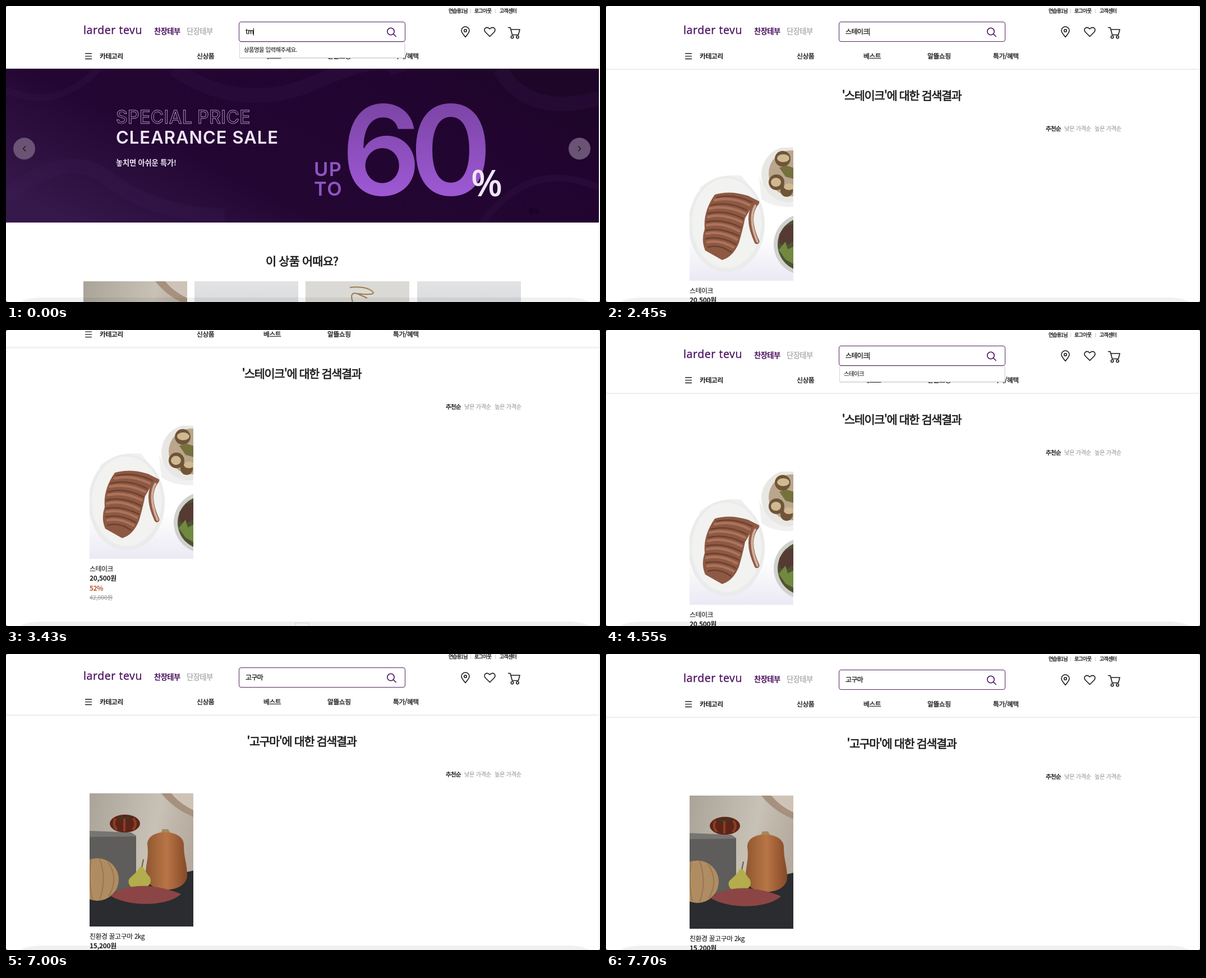
These frames come from a looping animation (1059 by 529 pixels, 8000 ms). An HTML page:

```html
<!DOCTYPE html>
<html lang="ko">
<head>
<meta charset="utf-8">
<style>
  html, body { margin: 0; width: 100%; height: 100%; overflow: hidden; background: #222; }
  #stage { display: block; width: 1059px; height: 529px; background: #fff; border-radius: 3px; }
  text {
    font: 400 11.9px "Noto Sans CJK KR", "Noto Sans CJK", "Noto Sans", sans-serif;
    letter-spacing: -.55px; white-space: pre;
    color: #1c1c1c; fill: currentColor; stroke: currentColor; stroke-width: .35px;
  }
  .top { font-size: 8.9px; }
  .small { font-size: 10.4px; }
  .brand { font-size: 13.3px; }
  .title { font-size: 20.8px; letter-spacing: -.8px; stroke-width: .7px; text-anchor: middle; }
  .bold { font-weight: 700; stroke: none; }
  .light { stroke-width: .12px; }
  .gray { color: #999; stroke-width: .12px; }
  .purple { color: #4b1160; }
  .logo { font: 400 19.5px "Open Sans", sans-serif; letter-spacing: .6px; }
  .promo { font: 600 31px Inter, sans-serif; letter-spacing: 1px; color: #f0e4f8; stroke: none; }
  .outline { font-size: 32px; font-weight: 500; letter-spacing: .4px; fill: none; stroke: #b69bc5; stroke-width: .9px; }
  .up { font-size: 34.4px; letter-spacing: 1.5px; color: #9054c4; }
  .big { font-size: 222px; letter-spacing: 0; text-anchor: middle; fill: url(#violet); }
  .percent { font: 600 65px "Open Sans", sans-serif; letter-spacing: 0; }
  .icon { fill: none; stroke: #1a1a1a; stroke-width: 1.6; stroke-linecap: round; stroke-linejoin: round; }
</style>
</head>
<body>
<svg id="stage" viewBox="0 0 1059 529">
  <defs>
    <linearGradient id="violet" x2="0" y2="1">
      <stop offset=".2" stop-color="#7c45a6"/><stop offset=".85" stop-color="#a05ad8"/>
    </linearGradient>
    <linearGradient id="night" y1=".8" x2="1" y2=".3">
      <stop offset="0" stop-color="#36194b"/><stop offset=".35" stop-color="#230632"/>
      <stop offset=".8" stop-color="#220430"/><stop offset="1" stop-color="#1d0628"/>
    </linearGradient>
    <linearGradient id="wall" x2="1" y2=".3">
      <stop offset="0" stop-color="#aaa397"/><stop offset=".65" stop-color="#c8c1b6"/><stop offset="1" stop-color="#b5aa9d"/>
    </linearGradient>
    <linearGradient id="squash">
      <stop offset="0" stop-color="#8f5730"/><stop offset=".5" stop-color="#b87546"/><stop offset="1" stop-color="#864926"/>
    </linearGradient>
    <linearGradient id="cloth" x2="0" y2="1">
      <stop offset=".65" stop-color="#fff"/><stop offset="1" stop-color="#ebe9f4"/>
    </linearGradient>
    <linearGradient id="pale" x2="0" y2="1">
      <stop offset="0" stop-color="#e2e3e5"/><stop offset="1" stop-color="#d6d7da"/>
    </linearGradient>
    <clipPath id="banner"><path d="M0 112H1057V387H0Z"/></clipPath>

    <symbol id="steak" viewBox="0 0 185 238">
      <rect width="185" height="238" fill="url(#cloth)"/>
      <path d="M18 72Q50 45 92 50L104 65 90 82 20 90ZM124 52Q140 92 185 99V106Q150 108 128 92Z" fill="#f0f0f1"/>
      <ellipse cx="66" cy="137" rx="68" ry="86" fill="#eaebeb"/>
      <ellipse cx="66" cy="135" rx="62" ry="80" fill="#f2f2f1"/>
      <path d="M45 84Q72 76 104 86L124 96Q126 104 110 107L99 126Q94 150 88 170Q78 195 58 201L28 184Q20 166 27 145Q24 114 45 84Z" fill="#8d5943"/>
      <g fill="none" stroke-linecap="round">
        <path d="M48 89Q80 82 112 98M38 103Q68 95 102 112M33 118Q62 110 96 127M30 133Q58 126 92 143M29 148Q55 142 88 158M29 163Q54 157 83 173M33 178Q53 172 74 187" stroke="#6c4030" stroke-width="2.5"/>
        <path d="M45 94Q76 87 107 103M36 109Q66 102 99 118M33 124Q60 117 93 133M31 139Q57 132 88 149M30 154Q55 148 84 164M32 169Q53 164 78 178" stroke="#ad735a" stroke-width="4.5"/>
        <path d="M118 100Q100 125 120 168" stroke="#8f5a45" stroke-width="9"/>
        <path d="M117 104Q104 128 121 168" stroke="#d2b19f" stroke-width="4"/>
      </g>
      <circle cx="178" cy="48" r="50" fill="#e9e7e4"/>
      <circle cx="182" cy="46" r="41" fill="#b9a68d"/>
      <g fill="#6f5436"><circle cx="166" cy="20" r="14"/><circle cx="155" cy="62" r="14"/><circle cx="173" cy="77" r="11"/></g>
      <path d="M160 36l12-4 13 4v20l-14-4z" fill="#75713d"/>
      <g fill="#cfb993"><ellipse cx="167" cy="19" rx="11" ry="7"/><ellipse cx="154" cy="62" rx="9" ry="8"/><ellipse cx="177" cy="70" rx="9" ry="6"/></g>
      <circle cx="205" cy="173" r="55" fill="#d0d1cd"/>
      <circle cx="205" cy="173" r="48" fill="#4f5234"/>
      <path d="M160 155l12-15 13-3v30l-14 9-11-5z" fill="#553a33"/>
      <path d="M159 183l12-15 4 14 10-5v31l-14-8z" fill="#71893f"/>
    </symbol>

    <symbol id="harvest" viewBox="0 0 185 238">
      <rect width="185" height="238" fill="url(#wall)"/>
      <path d="M128 0Q150 28 185 42V30Q160 18 146 0Z" fill="#a6917f"/>
      <path d="M146 0Q160 18 185 30V0Z" fill="#cfc3b7"/>
      <path d="M0 182L80 162 185 138V238H0Z" fill="#2b2c2f"/>
      <path d="M0 68L74 70 83 76V168L0 186Z" fill="#5e5d5b"/>
      <path d="M0 67L74 70 83 77 0 78Z" fill="#777572"/>
      <ellipse cx="63" cy="54" rx="27" ry="16" fill="#5f2418"/>
      <path d="M46 45Q40 57 49 65M62 45V68M78 45Q86 56 77 65" fill="none" stroke="#874027" stroke-width="4"/>
      <path d="M51 41l12 3 10-5-3 8-8-2-8 3z" fill="#343c25"/>
      <path d="M126 73l4-9h10l5 9z" fill="#a48a5c"/>
      <path d="M103 92C101 62 168 62 168 92C168 116 174 125 174 146C174 181 100 181 100 146C100 125 106 116 103 92Z" fill="url(#squash)"/>
      <circle cx="14" cy="154" r="38" fill="#b08c62"/>
      <path d="M3 117Q-3 155 5 190M18 117Q31 154 18 190M33 123Q53 152 34 184" fill="none" stroke="#987850" stroke-width="2"/>
      <path d="M93 133L96 118" stroke="#6f5a2d" stroke-width="2"/>
      <path d="M89 132C98 128 99 142 107 149C120 174 64 180 70 154C77 145 83 144 89 132Z" fill="#b3ad4d"/>
      <path d="M37 183C60 163 112 158 163 180C139 202 72 204 37 183Z" fill="#8c4545"/>
    </symbol>
  </defs>

  <g id="page">
    <g id="home">
      <rect y="112" width="1057" height="275" fill="url(#night)"/>
      <g clip-path="url(#banner)" fill="none" stroke="#40205a" stroke-width="26" opacity=".2">
        <path d="M0 340Q110 250 185 310T390 375M300 112Q420 195 555 135T700 120M880 112Q930 200 1057 165"/>
        <path d="M0 150Q90 190 165 112M850 387Q935 270 1057 325" stroke-width="12"/>
      </g>
      <text class="promo outline" x="196" y="210">SPECIAL PRICE</text>
      <text class="promo" x="196" y="246">CLEARANCE SALE</text>
      <text class="bold" x="196" y="284.5" style="font-size:13.2px;letter-spacing:-.15px;color:#f0e6f5">놓치면 아쉬운 특가!</text>
      <text class="promo up" x="549" y="304">UP</text>
      <text class="promo up" x="549" y="339">TO</text>
      <text class="promo big" x="669" y="338">6</text>
      <text class="promo big" x="793" y="338">0</text>
      <text class="promo percent" x="829" y="340">%</text>
      <text class="small bold" x="932" y="371" style="color:#12031a">문구</text>
      <g fill="#6b5375"><circle cx="32.5" cy="255" r="19.5"/><circle cx="1022.5" cy="255" r="19.5"/></g>
      <path class="icon" d="M34.5 251l-4 4 4 4M1020.5 251l4 4-4 4"/>
      <text class="title" x="527.5" y="464.3">이 상품 어때요?</text>
      <use href="#harvest" x="138" y="492" width="185" height="238"/>
      <g fill="url(#pale)"><path d="M336 492h185v60H336z"/><path d="M733 492h185v60H733z"/></g>
      <path d="M534 492h185v60H534z" fill="#dad9d5"/>
      <path d="M613 503Q640 500 652 509T626 514Q612 510 618 529M626 514L644 522" fill="none" stroke="#a07b4d" stroke-width="2"/>
    </g>

    <g id="results">
      <rect y="112" width="1057" height="2.5" fill="#efefef"/>
      <text id="heading" class="title" x="527" y="168" style="letter-spacing:-1.4px"></text>
      <text class="small" x="784" y="222.7">추천순</text>
      <text class="small gray" x="817" y="222.7">낮은 가격순</text>
      <text class="small gray" x="871" y="222.7">높은 가격순</text>
      <use id="photo" x="149" y="253" width="185" height="238"/>
      <text id="name" class="light" x="149" y="512.7" style="letter-spacing:-.4px"></text>
      <text id="price" class="bold" x="149" y="530" style="letter-spacing:-.3px"></text>
      <g id="discount">
        <text class="bold" x="149" y="548" style="color:#b9572f">52%</text>
        <text class="small gray" x="149" y="564.3" style="letter-spacing:0;text-decoration:line-through">42,000원</text>
      </g>
      <rect x="515.5" y="605.5" width="24" height="24" fill="none" stroke="#e2e2e2"/>
    </g>

    <text class="top" x="789" y="11.6" style="letter-spacing:-.8px">연습용1님</text>
    <text class="top" x="835" y="11.6">로그아웃</text>
    <text class="top" x="880" y="11.6">고객센터</text>
    <path d="M828.5 5v8M872.5 5v8" stroke="#ccc"/>
    <text class="logo purple" x="138" y="50">larder tevu</text>
    <text class="brand bold purple" x="264" y="49.8">찬장테부</text>
    <text class="brand" x="322" y="49.8" style="color:#aaa">단장테부</text>
    <g class="icon">
      <path d="M819 55.5C815 50 812 47.5 812 44a7 7 0 0 1 14 0C826 47.5 823 50 819 55.5Z"/>
      <circle cx="819" cy="44" r="2.3"/>
      <path d="M862.5 54.5L854.5 46.5C850 41 857 35 862.5 41C868 35 875 41 870.5 46.5Z"/>
      <path d="M895.5 38.5h3.5l3.5 13h11l2.500-9.500h-16"/>
      <circle cx="902.5" cy="55.500" r="2.200"/><circle cx="912" cy="55.500" r="2.200"/>
      <path d="M141.500 85h11M141.500 89.700h11M141.500 94.500h11" stroke-width="1.300"/>
    </g>
    <text class="bold" x="167" y="94.300">카테고리</text>
    <text x="340" y="94.300">신상품</text>
    <text x="459" y="94.300">베스트</text>
    <text x="573" y="94.300">알뜰쇼핑</text>
    <text x="690" y="94.300">특가/혜택</text>

    <rect x="415.500" y="28.500" width="296" height="35" rx="3.500" fill="#fff" stroke="#532465"/>
    <g class="icon" style="stroke:#4b1160"><circle cx="686" cy="45.500" r="6.200"/><path d="M690.700 50.200l4.500 4.300"/></g>
    <text id="query" x="427" y="50.300"></text>
    <path id="underline" stroke="#333"/>
    <path id="caret" stroke="#111"/>
    <g id="dropdown">
      <rect x="416" y="66" width="296" height="28" rx="2" opacity=".12"/>
      <rect x="416.500" y="64.500" width="294.500" height="28" rx="2" fill="#fff" stroke="#d5d5d5"/>
      <text id="hint" class="small light" x="424" y="82.200"></text>
    </g>
  </g>
  <path d="M25 529C32 524 50 521 64 521H1003C1018 521 1035 525 1041 529Z" opacity=".06"/>
  <path d="M1057.500 0V529" stroke="#eee"/>
</svg>

<script>
const LOOP = 8000, STEP = 70, MAX_SCROLL = 128;
const $ = id => document.getElementById(id);
const show = (id, on) => $(id).style.display = on ? '' : 'none';
const setText = (id, s) => { if ($(id).textContent !== s) $(id).textContent = s; };

const products = [
  { word: '스테이크', name: '스테이크', price: '20,500원', photo: '#steak' },
  { word: '고구마', name: '친환경 꿀고구마 2kg', price: '15,200원', photo: '#harvest' }
];

// Each track is a list of [start time, value].
const typed = [
  [0, 'tm'], [70, 't'], [210, ''], [490, 'ㅅ'], [560, '스'], [700, '슽'], [770, '스테'],
  [910, '스텡'], [980, '스테이'], [1120, '스테잌'], [1190, '스테이크'],
  [4620, '스테이'], [4760, '스테'], [4830, '스'], [4900, ''],
  [5390, 'ㄱ'], [5460, '고'], [5600, '곡'], [5670, '고구'], [5810, '고굼'], [5880, '고구마']
];
const dropdown = [[0, 1], [280, 0], [490, 1], [1400, 0], [4200, 1], [4970, 0], [5390, 1], [6090, 0]];
const composing = [[0, 0], [490, 1], [1400, 0], [5390, 1], [6090, 0]];
const caret = [[0, 1], [1890, 0], [2450, 1], [4060, 0], [4550, 1], [6580, 0]];
const page = [[0, null], [1470, products[0]], [6160, products[1]]];

const at = (track, t) => track.filter(([start]) => start <= t).pop()[1];
const ramp = (t, from, to) => Math.min(1, Math.max(0, (t - from) / (to - from)));
const scrollPulse = (t, down, downEnd, up, upEnd) =>
  MAX_SCROLL * (ramp(t, down, downEnd) ** 2.5 - ramp(t, up, upEnd) ** 2);

function render(time) {
  const t = Math.floor(time / STEP) * STEP;
  const text = at(typed, t), product = at(page, t);
  const scroll = scrollPulse(t, 2450, 2800, 3220, 3570) + scrollPulse(t, 6930, 7210, 7350, 7700);
  $('page').setAttribute('transform', `translate(0 ${-scroll})`);

  show('home', !product);
  show('results', product);
  if (product) {
    setText('heading', `'${product.word}'에 대한 검색결과`);
    setText('name', product.name);
    setText('price', product.price);
    $('photo').setAttribute('href', product.photo);
    show('discount', product === products[0]);
  }

  setText('query', text);
  const end = 427 + (text ? $('query').getComputedTextLength() : 0);
  $('caret').setAttribute('d', `M${Math.round(end) + .5} 39.5V53`);
  $('underline').setAttribute('d', `M${end - 10} 52.5H${end}`);
  show('caret', at(caret, t));
  show('underline', at(composing, t));

  const match = text && products.find(p => p.name.includes(text));
  setText('hint', match ? match.name : '상품명을 입력해주세요.');
  show('dropdown', at(dropdown, t));
}

function frame() {
  render(performance.now() % LOOP);
  requestAnimationFrame(frame);
}
frame();
</script>
</body>
</html>
```
